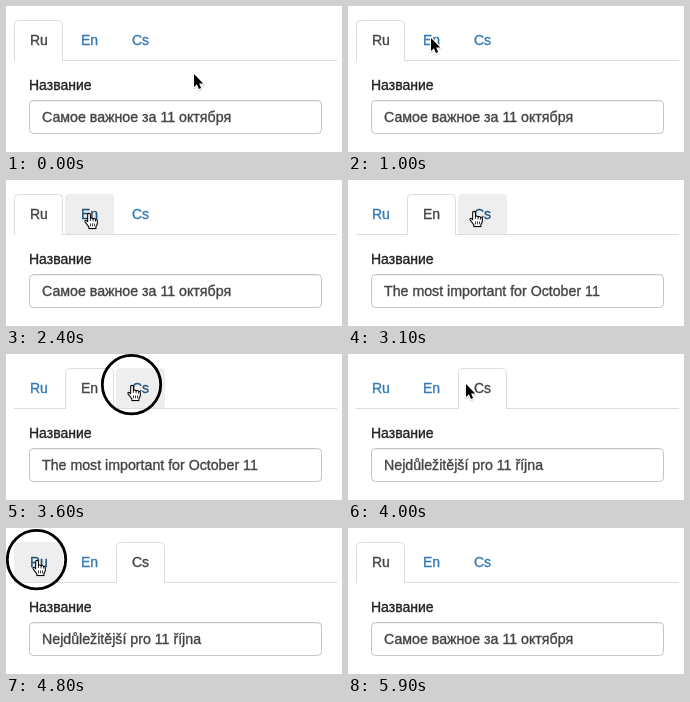
Write an HTML page with a canvas that moves like this. It is 336 by 146 pixels and loops after 6.9 s.

```html
<!DOCTYPE html>
<html lang="ru">
<head>
<meta charset="utf-8">
<title>Языковые вкладки</title>
<style>
html, body { margin: 0; width: 100%; height: 100%; overflow: hidden; background: #fff; }
canvas { display: block; width: 336px; height: 146px; }
</style>
</head>
<body>
<canvas id="stage"></canvas>
<script>
const W = 336, H = 146, LOOP = 6900, STEP = 100;
const canvas = document.getElementById('stage');
const ratio = window.devicePixelRatio || 1;
canvas.width = W * ratio;
canvas.height = H * ratio;
const ctx = canvas.getContext('2d');

const tabs = [
  { name: 'Ru', x: 8, w: 49, text: 'Самое важное за 11 октября' },
  { name: 'En', x: 59, w: 49, text: 'The most important for October 11' },
  { name: 'Cs', x: 110, w: 49, text: 'Nejdůležitější pro 11 října' }
];
const TAB_TOP = 14, LINE_Y = 54, LINE_END = 331;

// Pointer stops: time, x, y
const route = [
  [0, 188, 68], [600, 83, 32], [1300, 83, 32], [1400, 83, 33],
  [2900, 83, 33], [3100, 126, 31], [3800, 126, 31], [4000, 118, 30],
  [4200, 53, 33], [4500, 31, 32], [5000, 31, 32], [5100, 29, 32],
  [5500, 29, 32], [5900, 37, -20]
];
const handSpans = [[1300, 2500], [3100, 3800], [4100, 5100]];
const clicks = [2300, 3600, 4800];

const within = (t, from, to) => t >= from && t < to;

function pointerAt(t) {
  const next = route.findIndex(stop => stop[0] > t);
  if (next < 0) return { x: 37, y: -20 };
  const [t0, x0, y0] = route[next - 1], [t1, x1, y1] = route[next];
  const u = (t - t0) / (t1 - t0), k = u * u * (3 - 2 * u);
  return { x: x0 + (x1 - x0) * k, y: y0 + (y1 - y0) * k };
}

function activeTab(t) {
  if (within(t, 2500, 3800)) return 1;
  if (within(t, 3800, 5000)) return 2;
  return 0;
}

// A hairline outline gives the slightly heavy smoothing of the text
function label(text, x, y, color, size = 14) {
  ctx.font = `${size}px "Liberation Sans", Arial, sans-serif`;
  ctx.fillStyle = ctx.strokeStyle = color;
  ctx.lineWidth = 0.35;
  ctx.lineJoin = 'round';
  ctx.fillText(text, x, y);
  ctx.strokeText(text, x, y);
}

function tabShape(x, w, inset) {
  const l = x + inset, r = x + w - inset, top = TAB_TOP + inset;
  ctx.beginPath();
  ctx.moveTo(l, LINE_Y + 1);
  ctx.lineTo(l, top + 4);
  ctx.quadraticCurveTo(l, top, l + 4, top);
  ctx.lineTo(r - 4, top);
  ctx.quadraticCurveTo(r, top, r, top + 4);
  ctx.lineTo(r, LINE_Y + 1);
}

function drawTab(tab, active, hovered) {
  if (active) {
    tabShape(tab.x, tab.w, 0.5);
    ctx.fillStyle = '#fff';
    ctx.fill();
    ctx.strokeStyle = '#ddd';
    ctx.lineWidth = 1;
    ctx.stroke();
  } else if (hovered) {
    tabShape(tab.x, tab.w, 0);
    ctx.fillStyle = '#eee';
    ctx.fill();
    ctx.fillStyle = '#ddd';
    ctx.fillRect(tab.x, LINE_Y, tab.w, 1);
  }
  label(tab.name, tab.x + 16, 39, active ? '#444' : hovered ? '#23527c' : '#337ab7');
}

function drawField(text) {
  label('Название', 23, 84, '#222');
  ctx.beginPath();
  ctx.roundRect(23.5, 94.5, 292, 33, 4);
  ctx.fillStyle = '#fff';
  ctx.fill();
  ctx.strokeStyle = '#c4c4c4';
  ctx.lineWidth = 1;
  ctx.stroke();
  ctx.fillStyle = 'rgba(0,0,0,.06)';
  ctx.fillRect(26, 95, 287, 1);
  label(text, 36, 116, '#444', 14.2);
}

const arrow = new Path2D('M0 0V13L2.9 10.2L5 15L7.1 14.1L5.1 9.5H9.2Z');
const hand = new Path2D(
  'M-1.4 9.2V1.6Q-1.4 .4 0 .4Q1.5 .4 1.5 1.8V6' +
  'Q1.8 5 3 5.2Q4.2 5.3 4.3 6.5Q4.8 5.6 5.8 5.9Q6.8 6.1 6.9 7.2' +
  'Q7.5 6.6 8.2 7.1Q8.8 7.5 8.8 8.6V10.6Q8.6 12.4 7.3 14V16.4' +
  'H-.1V14.6L-2.2 11.8L-4.1 9.3Q-4.7 8.2-3.7 7.8Q-2.8 7.5-1.4 9.2Z');
const knuckles = new Path2D('M1.5 6V8.5M4.3 6.5V8.8M6.9 7.2V9.2M1.6 11V14M3.7 11V14M5.8 11V14');

function drawPointer({ x, y }, isHand) {
  ctx.save();
  ctx.translate(x, y);
  ctx.lineJoin = 'round';
  ctx.shadowColor = 'rgba(0,0,0,.2)';
  ctx.shadowBlur = 1.5 * ratio;
  ctx.shadowOffsetY = ratio;
  if (isHand) {
    ctx.scale(0.95, 0.95);
    ctx.fillStyle = '#fff';
    ctx.fill(hand);
    ctx.shadowColor = 'transparent';
    ctx.strokeStyle = '#000';
    ctx.lineWidth = 1.1;
    ctx.stroke(hand);
    ctx.lineWidth = 0.8;
    ctx.stroke(knuckles);
  } else {
    ctx.strokeStyle = '#fff';
    ctx.lineWidth = 2;
    ctx.stroke(arrow);
    ctx.shadowColor = 'transparent';
    ctx.fillStyle = '#000';
    ctx.fill(arrow);
  }
  ctx.restore();
}

function drawRing({ x, y }) {
  ctx.beginPath();
  ctx.arc(x - 0.5, y - 0.4, 29.2, 0, Math.PI * 2);
  ctx.strokeStyle = '#000';
  ctx.lineWidth = 2.8;
  ctx.stroke();
}

function render(t) {
  const pointer = pointerAt(t);
  const isHand = handSpans.some(([from, to]) => within(t, from, to));
  const active = activeTab(t);

  ctx.setTransform(ratio, 0, 0, ratio, 0, 0);
  ctx.fillStyle = '#fff';
  ctx.fillRect(0, 0, W, H);
  ctx.fillStyle = '#ddd';
  ctx.fillRect(8, LINE_Y, LINE_END - 8, 1);
  tabs.forEach((tab, i) => {
    const hovered = isHand && within(pointer.x, tab.x, tab.x + tab.w);
    drawTab(tab, i === active, hovered);
  });
  drawField(tabs[active].text);
  if (t < 5900) drawPointer(pointer, isHand);
  if (clicks.some(c => within(t, c, c + STEP))) drawRing(pointer);
}

const start = performance.now();
function tick() {
  const t = (performance.now() - start) % LOOP;
  render(Math.floor(t / STEP) * STEP);
  requestAnimationFrame(tick);
}
tick();
</script>
</body>
</html>
```
